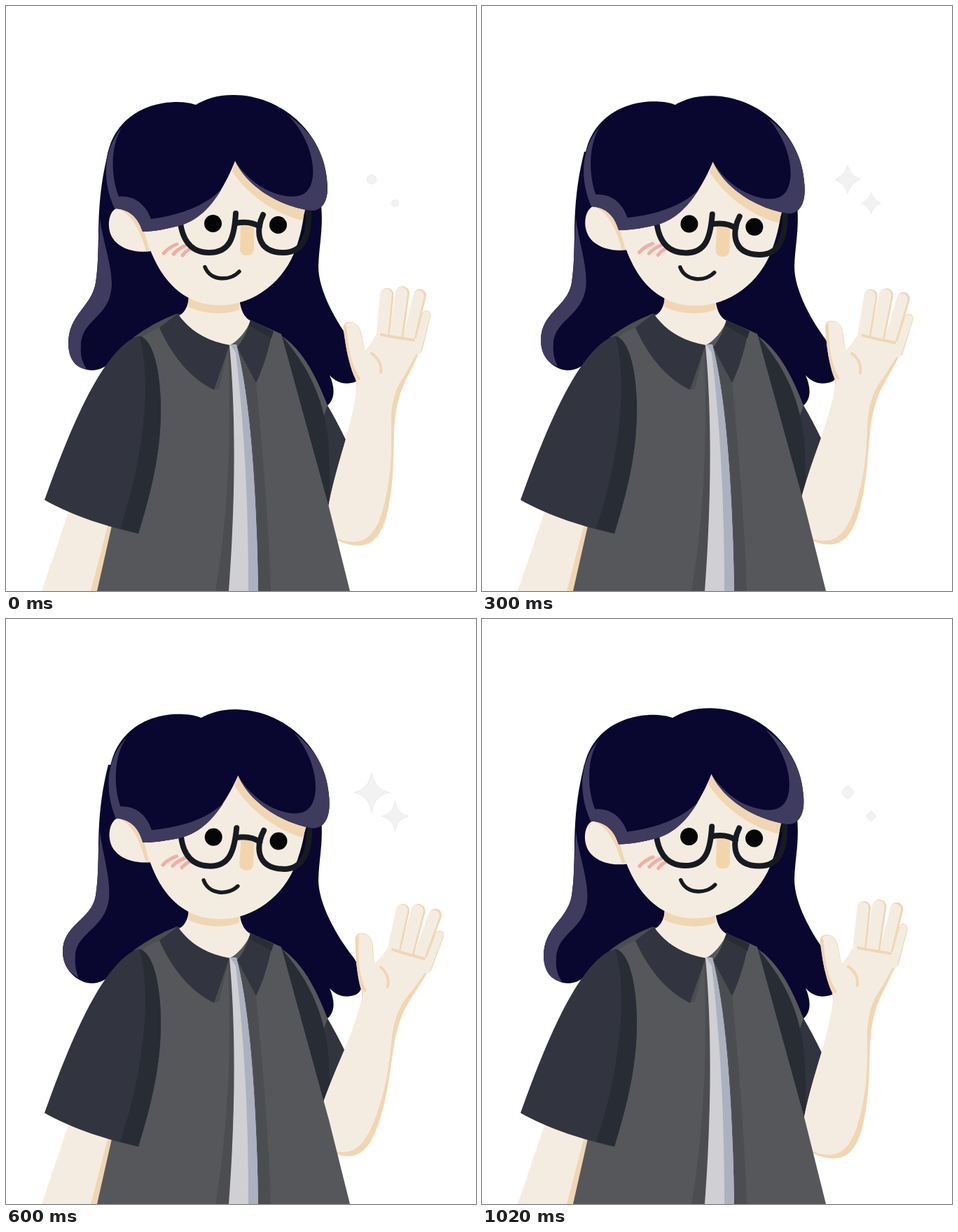
An HTML page without scripts for the animation above (1080 ms loop, 671x835 px).

```html
<!DOCTYPE html>
<html lang="en">
<head>
<meta charset="utf-8">
<title>Waving girl</title>
<style>
  html, body { margin: 0; width: 100%; height: 100%; overflow: hidden; background: #fff; }
  svg { display: block; width: 100%; height: 100%; }

  .navy { fill: #09062f; }
  .sheen { fill: #3f3b5f; }
  .skin { fill: #f5ece1; }
  .tan { fill: #f0d6b3; }
  .gray { fill: #56575a; }
  .fold { fill: #4b4d51; }
  .cloth { fill: #32353f; }
  .dark { fill: #282c35; }
  .line { fill: none; stroke-linecap: round; stroke-linejoin: round; }
  .frame { stroke: #171b21; stroke-width: 8; }
  .crease { stroke: #f0d6b3; stroke-width: 4; }
  .blush { stroke: #f0aea6; stroke-width: 5; }
  .star { fill: #f2f2f2; stroke: #dedede; stroke-width: .6; }

  /* One clock, 0 to 1 and back in nine steps each way, drives every part */
  @property --t { syntax: "<number>"; inherits: true; initial-value: 0; }
  svg, .lobe, .lock, .star { animation: clock 1080ms steps(9) infinite; }
  @keyframes clock { 50% { --t: 1; } }

  .head {
    transform-origin: 275px 328px;
    transform: rotate(calc(var(--t) * 2.6deg));
  }
  /* The arm speeds up as it swings out */
  .arm {
    transform-origin: 522px 604px;
    transform: rotate(calc(var(--t) * (.4 + .6 * var(--t)) * 8.2deg));
  }

  .lobe {
    animation-name: lobe;
    d: path("M146 208C138 240 132 275 132 330C131 350 132 370 128 395C122 430 89 440 89 482C89 505 105 520 123 520C137 520 150 510 158 500L260 470V208Z");
  }
  @keyframes lobe {
    50% { d: path("M146 208C138 240 132 275 132 330C131 350 132 370 128 395C122 430 80 435 80 474C80 500 102 520 123 520C137 520 150 510 158 500L260 470V208Z"); }
  }
  .lock {
    animation-name: lock;
    d: path("M134 303C132 330 132 370 128 395C122 430 89 440 89 482C89 505 100 517 116 519C108 508 106 498 107 485C108 445 151 445 151 395C150 365 138 335 134 303Z");
  }
  @keyframes lock {
    50% { d: path("M134 303C132 330 132 370 128 395C122 430 80 435 80 474C80 492 89 504 102 511C98 500 97 490 98 478C102 445 147 440 147 390C147 362 138 335 134 303Z"); }
  }
  .star {
    animation-name: twinkle;
    d: path("M0 -6.5C3.6 -6.5 6.5 -3.6 6.5 0C6.5 3.6 3.6 6.5 0 6.5C-3.6 6.5 -6.5 3.6 -6.5 0C-6.5 -3.6 -3.6 -6.5 0 -6.5Z");
  }
  @keyframes twinkle {
    50% { d: path("M0 -31C3 -12 11 -4 27 0C11 4 3 12 0 31C-3 12 -11 4 -27 0C-11 -4 -3 -12 0 -31Z"); }
  }
</style>
</head>
<body>
<svg viewBox="0 0 671 835" preserveAspectRatio="none">
  <g transform="translate(522 247.5)"><path class="star"/></g>
  <g transform="translate(555.5 281.5) scale(.78)"><path class="star"/></g>

  <!-- back hair -->
  <path class="navy" d="M200 220L440 200L450 285C453 320 447 340 446 372C446 405 470 450 496 483C508 500 515 528 500 536C485 542 472 538 462 527C470 545 470 562 458 571L200 500Z"/>
  <path class="navy lobe"/>
  <path class="sheen lock"/>

  <!-- far sleeve -->
  <path class="cloth" d="M440 535L459 570Q472 592 485 619L461 716L440 640Z"/>
  <path class="gray" d="M380 464C421 480 444 532 459 570L452 590L393 480Z"/>
  <path class="dark" d="M393 470C428 510 453 555 460 620C462 655 463 680 461 716L440 680Z"/>

  <!-- waving arm -->
  <g class="arm">
    <g class="line" stroke="#f0d6b3">
      <path stroke-width="19" d="M544 412L538 475"/>
      <path stroke-width="20" d="M566 410L557 475"/>
      <path stroke-width="18" d="M591 413L576 475"/>
      <path stroke-width="13" d="M600 441L588 490"/>
    </g>
    <path class="tan" d="M460 716C470 660 490 610 497 570C500 555 502 545 499 533C490 515 486 490 482 465C480 455 484 451 490 451C500 450 506 458 508 470C510 480 512 490 513 493Q522 482 528 470L583 477L600 465C597 482 583 510 570 536C560 556 555 580 554 610C553 650 553 680 547 710C541 745 530 770 503 770C490 770 477 766 466 758L450 740Z"/>
    <path class="skin" d="M460 716C470 660 490 610 497 570C500 555 502 545 501 533C494 515 489 490 484 465C482 455 486 452 491 452C500 451 505 459 507 470C509 480 512 492 513 494Q523 480 529 468L583 475L596 472C591 488 577 515 562 538C552 556 549 580 550 600C551 640 549 670 542 702C535 735 524 765 496 765C486 765 475 762 466 756L450 740Z"/>
    <g class="line" stroke="#f5ece1">
      <path stroke-width="16.5" d="M542.5 412L536 478"/>
      <path stroke-width="17.5" d="M564.5 410L555 478"/>
      <path stroke-width="15.5" d="M589 414L574 478"/>
      <path stroke-width="11" d="M600 441L587 492"/>
    </g>
    <path class="line crease" d="M536 469C552 473 567 474 582 477M522 496C531 502 537 512 535 523M484.5 458C486 490 492 515 504 532"/>
  </g>

  <!-- near arm -->
  <path class="skin" d="M90 720L51 835H130L152 738Z"/>
  <path class="tan" d="M147 735L121 835H134L156 735Z"/>

  <!-- jacket -->
  <path class="gray" d="M182 474L245 440L348 448L393 468L461 715L491 835H130L151 742L190 560Z"/>
  <path class="fold" d="M182 473Q210 452 244 439L247 444L219 460Q222 468 226 474L200 473Z"/>
  <path class="gray" d="M195 472Q208 463 219 459L236 490L222 520Z"/>
  <path class="cloth" d="M183 473C142 496 103 570 55 705C95 728 150 745 189 753C205 700 222 640 221 570C220 520 210 475 190 471Z"/>
  <path class="dark" d="M190 471C200 500 202 560 194 612C188 660 178 700 163 746L189 753C205 700 222 640 221 570C220 520 210 475 190 471Z"/>

  <!-- shirt and opening -->
  <path class="fold" d="M317 490C322 600 318 725 299 835H318C328 700 328 580 319 484L297 548L304 546Z"/>
  <path class="fold" d="M329 485C352 570 360 700 360 835H378C374 720 365 620 357 538Z"/>
  <path fill="#cfcfd4" d="M319 484H329C349 560 358 700 360 835H318C328 700 328 580 319 484Z"/>
  <path fill="#acb1c0" d="M320 483H329C349 560 358 700 360 835H346C346 720 342 620 328 495Z"/>

  <!-- neck and collar -->
  <path class="skin" d="M261 410C261 430 255 437 246 443C262 463 290 480 319 484C330 480 345 462 349 449C340 445 333 432 333 410Z"/>
  <path class="tan" d="M261 410L260 429C280 440 315 442 333 433V410Z"/>
  <path class="cloth" d="M245 439L219 459C235 495 260 530 297 548L319 484C285 478 262 463 245 439Z"/>
  <path class="cloth" d="M349 448L380 466C375 490 368 515 357 538L330 487C340 475 345 462 349 448Z"/>
  <path class="dark" d="M349 448L382 464L379 474L347 456Z"/>

  <!-- head -->
  <g class="head">
    <path class="skin" d="M185 300L194 320L203 340C208 355 214 367 222 380C245 415 275 427 303 427C353 428 398 394 415 343C422 322 426 300 426 285L327 210Z"/>
    <path class="skin" d="M157 289C145 296 144 318 152 331C162 347 185 353 207 350L196 318L175 288Z"/>
    <path class="tan" d="M156 289C176 293 190 315 200 349L205 349L196 318L178 285Z"/>
    <path class="tan" d="M327 218L323 236C345 270 385 297 423 306L428 288Z"/>
    <path fill="#f3d5ad" d="M335 312H354V347Q353 356 344 356Q334 356 334 347Z"/>
    <path class="line blush" d="M225 353Q233 344 244 340M239 354Q246 346 256 342M252 356Q257 349 264 346"/>
    <path class="line frame" d="M248 300C250 335 265 352 290 352C320 352 326 330 328 296M367 298C357 318 356 352 396 352C426 352 433 325 432 294M328 310Q349 306 362 315"/>
    <circle cx="295.5" cy="310.5" r="12.5" fill="#050505"/>
    <circle cx="388.5" cy="312.5" r="12.5" fill="#050505"/>
    <path class="line" stroke="#171b21" stroke-width="5.5" d="M284 372.500C292 393 320 393 333 379"/>
    <path class="navy" d="M143 230C145 170 190 137 245 137Q260 137 271 141C285 133 300 127 325 127C391 127 458 180 459 260C459 283 448 293 435 292C398 287 348 264 327 221C310 265 285 300 250 313C230 318 212 322 195 322C188 300 175 290 155 289C146 270 142 250 143 230Z"/>
    <path class="sheen" d="M166 173C148 200 150 245 161 272C185 270 200 285 207 304C250 298 285 285 308 261C290 292 270 307 250 313C230 318 212 322 195 322C188 300 175 290 155 289C146 270 142 250 143 230C145 205 152 190 166 173Z"/>
    <path class="sheen" d="M404 157C435 190 445 235 434 258C425 277 400 273 383 267C362 260 340 242 327 221C348 264 398 287 435 292C448 293 459 283 459 260C458 215 440 182 404 157Z"/>
  </g>
</svg>
</body>
</html>
```
